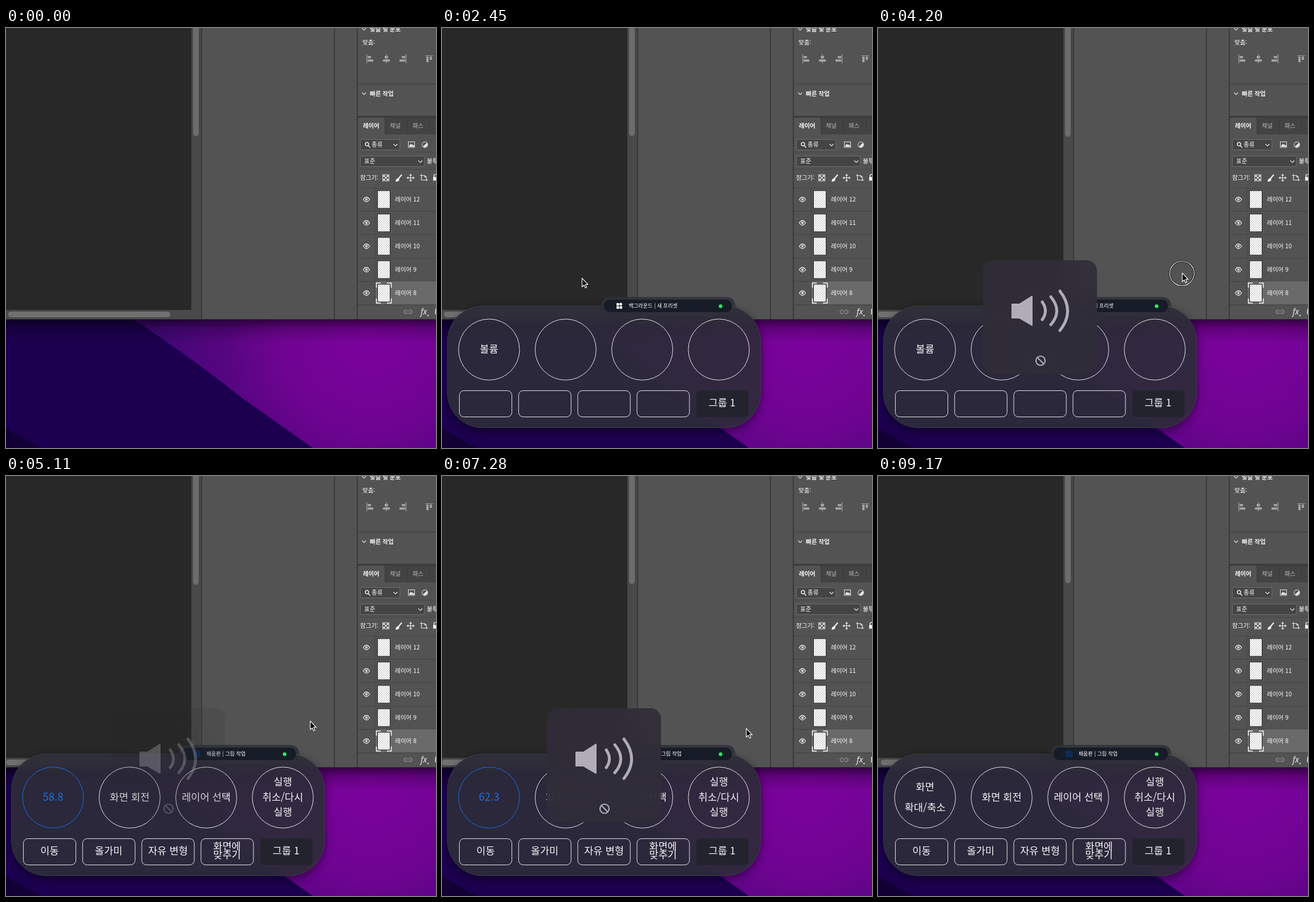
An HTML page that plays this animation: 754 px wide and 736 px high, repeating every 9310 ms.

```html
<!DOCTYPE html>
<html lang="ko">
<head>
<meta charset="utf-8">
<title>프리셋 전환</title>
<style>
  html, body { margin: 0; width: 100%; height: 100%; overflow: hidden; background: #1c004f; }
  #stage { position: relative; width: 754px; height: 736px; overflow: hidden; }
  #stage > * { position: absolute; left: 0; top: 0; }
  svg { display: block; }
  text { font-family: "Noto Sans CJK KR", "Noto Sans CJK", sans-serif; white-space: pre; }
  #stage > #panel {
    left: 9px; top: 487px; width: 548px; height: 212px; border-radius: 62px;
    border: 1px solid #5a5a6444; background: rgba(44, 45, 57, .91);
    backdrop-filter: blur(9px); box-shadow: 0 5px 16px #0007;
  }
  #stage > #hudBox {
    left: 184px; top: 407px; width: 200px; height: 200px; border-radius: 18px;
    background: rgba(48, 45, 57, .9); backdrop-filter: blur(24px);
  }
</style>
</head>
<body>
<div id="stage">
  <svg id="desktop" width="754" height="736"></svg>
  <div id="panel"></div>
  <svg id="face" width="754" height="736"></svg>
  <div id="hudBox"></div>
  <svg id="hudIcon" width="754" height="736" fill="none" stroke="#b0adb8">
    <path d="M235 484H248L270 470V521L248 508H235Z" fill="#b0adb8" stroke-width="2" stroke-linejoin="round"/>
    <path d="M288 480Q299 496 288 511M303 471Q324 496 303 520M319 461Q346 496 319 530" stroke-width="5" stroke-linecap="round"/>
    <path d="M279 577L291 589" stroke-width="2.200"/>
    <circle cx="285" cy="583" r="8" stroke-width="2.200"/>
  </svg>
  <svg id="pointer" width="754" height="736">
    <g id="cursor">
      <g id="click" fill="none">
        <circle cy="1" r="21.500" stroke="#111" stroke-width="3"/>
        <circle cy="1" r="21.500" stroke="#eee" stroke-width="1.200"/>
      </g>
      <path d="M.5 .5V15.500L4 12.300L6.300 17.500L8.700 16.400L6.400 11.400H11Z" fill="#080808" stroke="#fff" stroke-width="1.100" stroke-linejoin="round"/>
    </g>
  </svg>
</div>
<script>
const LOOP = 9310, STEP = 70;
const $ = id => document.getElementById(id);

const rect = (x, y, w, h, fill, more = '') =>
  `<rect x="${x}" y="${y}" width="${w}" height="${h}" fill="${fill}" ${more}/>`;
const path = (d, color = '#e4e4e4', width = 1.2, fill = 'none') =>
  `<path d="${d}" stroke="${color}" stroke-width="${width}" fill="${fill}"/>`;
// y is the optical middle of the line
const text = (x, y, str, size = 10.5, color = '#fff', weight = 500, more = '') =>
  `<text x="${x}" y="${y + size * .37}" font-size="${size}" fill="${color}" font-weight="${weight}" ${more}>${str}</text>`;
const label = (x, y, str, color = '#f4f4f7', size = 17.6) =>
  text(x, y, str, size, color, 350, 'text-anchor="middle"');
const chevron = (x, y, s = 3.5) => path(`M${x - s} ${y - s / 2}L${x} ${y + s / 2}L${x + s} ${y - s / 2}`);

function wallpaper() {
  return `<defs>
    <radialGradient id="violet" gradientUnits="userSpaceOnUse" cx="640" cy="540" r="400">
      <stop offset="0" stop-color="#7c029e"/><stop offset=".4" stop-color="#6f0492"/>
      <stop offset=".65" stop-color="#560580"/><stop offset="1" stop-color="#3c0872"/>
    </radialGradient>
    <linearGradient id="edge" x2="0" y2="1">
      <stop offset="0" stop-color="#000" stop-opacity=".55"/><stop offset=".4" stop-color="#000" stop-opacity=".2"/>
      <stop offset="1" stop-color="#000" stop-opacity="0"/>
    </linearGradient>
    <pattern id="checks" width="4" height="4" patternUnits="userSpaceOnUse">
      ${rect(0, 0, 4, 4, '#fff') + rect(0, 0, 2, 2, '#d6d6d6') + rect(2, 2, 2, 2, '#d6d6d6')}
    </pattern></defs>`
    + rect(0, 511, 754, 225, 'url(#violet)')
    + path('M0 511H225Q325 578 415 649L538 736H0Z', 'none', 0, '#1c004f')
    + path('M0 702L62 736H0Z', 'none', 0, '#120034')
    + rect(0, 511, 754, 40, 'url(#edge)');
}

function canvasArea() {
  return rect(0, 0, 754, 511, '#535353')
    + rect(0, 0, 325, 494, '#282828')
    + rect(325, 0, 17, 511, '#494949') + rect(0, 494, 342, 17, '#494949')
    + `<rect id="vThumb" x="328" y="-20" width="10" rx="5" fill="#6c6c6c"/>`
    + `<rect id="hThumb" y="497" height="10" rx="5" fill="#707070"/>`
    + [342, 575, 615].map(x => rect(x, 0, 2, 511, '#3a3a3a')).join('')
    + rect(0, 510, 754, 1, '#303030');
}

function alignSection() {
  const grey = '#a2a2a2';
  return chevron(628, 2) + text(638, 2, '맞춤 및 분포', 10.5, '#f0f0f0', 700)
    + text(625, 25, '맞춤:')
    + path('M632.5 46V62M667 46V62M701.500 46V62M735 48.500H749', grey)
    + rect(634, 49, 6, 4, grey) + rect(634, 55, 10, 4, grey)
    + rect(664, 49, 6, 4, grey) + rect(661, 55, 12, 4, grey)
    + rect(694, 49, 6, 4, grey) + rect(690, 55, 10, 4, grey)
    + rect(737, 50, 4, 10, grey) + rect(743, 50, 4, 6, grey)
    + rect(617, 98, 137, 1, '#3f3f3f')
    + chevron(628, 115) + text(638, 115, '빠른 작업', 10.5, '#f0f0f0', 700);
}

function layerControls() {
  const box = (y, w) => rect(621.5, y, w, 18, '#444', 'rx="1.5" stroke="#6b6b6b"');
  let out = rect(617, 154, 137, 32, '#3b3b3b')
    + rect(617, 157, 47, 29, '#535353') + rect(665, 157, 38, 28, '#434343')
    + rect(704, 157, 39, 28, '#434343') + rect(744, 157, 10, 28, '#434343')
    + text(626, 171, '레이어', 10.3, '#fff', 700)
    + text(673, 171, '채널', 10.3, '#b8b8b8') + text(713, 171, '패스', 10.3, '#b8b8b8')
    + [217, 247, 280].map(y => rect(617, y, 137, 1, '#474747')).join('')
    + box(195.5, 69) + box(224.5, 112)
    + '<circle cx="633" cy="203.500" r="3" fill="none" stroke="#eee" stroke-width="1.400"/>'
    + path('M635 206L638.500 209.500', '#eee', 1.6)
    + text(641, 204.500, '종류') + chevron(683, 205)
    + rect(705.5, 199.5, 11, 9.5, 'none', 'stroke="#e4e4e4"') + path('M707 208V206L710 203L712 205L713.500 204L716 207V208Z', 'none', 0, '#e4e4e4')
    + '<circle cx="734.500" cy="204.500" r="5" fill="none" stroke="#e4e4e4"/>'
    + path('M738 201A5 5 0 0 1 731 208Z', 'none', 0, '#e4e4e4')
    + text(628, 233.500, '표준') + chevron(726.500, 234) + text(738, 233.500, '불투명도')
    + text(621, 262.500, '잠그기:');
  out += rect(660.5, 257, 11, 11, 'none', 'stroke="#e4e4e4"');
  for (let i = 0; i < 9; i += 2) out += rect(661.5 + i % 3 * 3, 258 + Math.floor(i / 3) * 3, 3, 3, '#e4e4e4');
  return out
    + path('M694 257L688 264', '#eee', 2.2) + path('M688 263Q684 263 683 269Q689 270 690 265Z', 'none', 0, '#eee')
    + path('M704 262.500H715M709.500 257V268', '#eee')
    + path('M709.500 255.500L712 258.500H707ZM709.500 269.500L712 266.500H707ZM702.500 262.500L705.500 260V265ZM716.500 262.500L713.500 260V265Z', 'none', 0, '#eee')
    + path('M726 258.500H734L737 261V268M728.500 256V266.500H740M734 258V261H737')
    + rect(749, 261, 8, 6.5, '#eee') + path('M750.500 261V258Q753 255 756 258', '#eee', 1.4);
}

function layerRow(name, i) {
  const top = 280 + 41 * i, mid = top + 20.5, selected = i === 4;
  return (selected ? rect(648, top, 106, 41, '#6a6a6a') : '')
    + rect(617, top + 40.500, 137, 1, '#454545') + rect(646.5, top, 1, 41, '#474747')
    + path(`M626.500 ${mid}Q632 ${mid - 8} 637.500 ${mid}Q632 ${mid + 8} 626.500 ${mid}Z`, '#eee', 1.3)
    + `<circle cx="632" cy="${mid}" r="2" fill="#eee"/>`
    + rect(651.5, top + 5, 22, 31, 'url(#checks)', 'stroke="#222"')
    + (selected ? path(`M649.500 ${top + 11}V${top + 3}H657M668 ${top + 3}H675.500V${top + 11}M675.500 ${top + 30}V${top + 38}H668M657 ${top + 38}H649.500V${top + 30}`, '#fff', 1.5) : '')
    + text(682, mid, name);
}

function layerFooter() {
  return rect(617, 485, 137, 25, '#535353') + rect(617, 485, 137, 1, '#454545')
    + path('M704 494.500H701A3 3 0 0 0 701 500.500H704M706 494.500H709A3 3 0 0 1 709 500.500H706M702 497.500H708', '#999')
    + '<text x="727" y="502" font-size="14" font-style="italic" fill="#eee" style="font-family:\'Noto Sans\',sans-serif">fx</text>'
    + path('M738 503H742L740 505.500Z', 'none', 0, '#eee') + rect(752.5, 492, 2, 10, '#ddd');
}

$('desktop').innerHTML = wallpaper() + canvasArea() + alignSection() + layerControls()
  + [12, 11, 10, 9, 8].map((n, i) => layerRow('레이어 ' + n, i)).join('') + layerFooter();

const knobX = i => 82.5 + 134.3 * i, buttonX = i => 30.5 + 103.8 * i;
const four = [0, 1, 2, 3];

function pill(id, x, content) {
  return `<g id="${id}">`
    + path(`M${x - 5} 488V487Q${x - 4} 471.500 ${x + 9} 471.500H500Q514 473 514.500 488Z`, 'none', 0, '#2e3239d8')
    + rect(x, 476, 508.5 - x, 22, '#161c27', 'rx="11"') + content + '</g>';
}

$('face').innerHTML =
  path('M279.500 488Q280 472 294 472H498Q512 473 514 488', '#2c2d3088', 1)
  + pill('pillDesk', 284,
      rect(306, 482, 4.5, 4.5, '#fff') + rect(306, 487.5, 4.5, 4.5, '#fff') + rect(311.5, 487.5, 4.5, 4.5, '#fff')
      + path('M313.500 481L316.500 484L313.500 487L310.500 484Z', 'none', 0, '#fff')
      + text(327.500, 487, '백그라운드 | 새 프리셋', 9.1))
  + pill('pillDraw', 308, rect(329, 481, 12, 12, '#0c2a55', 'rx="2"') + text(351.500, 487, '채움판 | 그림 작업', 9.1))
  + '<circle cx="488.500" cy="487.500" r="3.200" fill="#30e860"/>'
  + four.map(i => `<circle id="knob${i}" cx="${knobX(i)}" cy="563.500" r="53.500" fill="none" stroke="#e6e6ec"/>`
      + rect(buttonX(i), 635.5, 92, 46, 'none', 'rx="8" stroke="#e6e6ec"')).join('')
  + rect(446, 635, 91.5, 47, '#23232e', 'rx="7"') + label(491, 656, '그룹 1')
  + `<g id="deskLabels">${label(82.5, 562.5, '볼륨')}</g>`
  + '<g id="drawLabels">'
    + `<g id="zoomName">${label(82.5, 544, '화면') + label(82.5, 580, '확대/축소')}</g>`
    + label(knobX(1), 562.5, '화면 회전') + label(knobX(2), 562.5, '레이어 선택')
    + label(knobX(3), 535, '실행') + label(knobX(3), 562.5, '취소/다시') + label(knobX(3), 588.5, '실행')
    + label(76.5, 656, '이동') + label(180, 656, '올가미') + label(284, 656, '자유 변형')
    + label(387.500, 648, '화면에') + label(387.500, 663, '맞추기')
  + '</g>'
  + label(82.5, 562.5, '<tspan id="zoomValue"></tspan>', '#1c6ee6', 18.5);

const clamp = v => Math.max(0, Math.min(1, v));
const ramp = (t, from, to) => clamp((t - from) / (to - from));
const within = (t, from, to) => t >= from && t < to;
const show = (id, alpha) => $(id).style.opacity = Number(alpha);

// time, x, y of the pointer tip
const route = [
  [210, 625, 745], [560, 245, 438], [3850, 245, 438], [4130, 533, 429],
  [5180, 533, 429], [5460, 625, 554], [6790, 625, 554], [7070, 533, 442],
  [8260, 533, 442], [8680, 610, 745]
];
function pointerAt(t) {
  const i = route.findIndex(key => key[0] > t);
  if (i <= 0) return [610, 760];
  const [a, b] = [route[i - 1], route[i]], p = ramp(t, a[0], b[0]), s = p * p * (3 - 2 * p);
  return [a[1] + (b[1] - a[1]) * s, a[2] + (b[2] - a[2]) * s];
}

function hudAlpha(t) {
  if (t < 2800) return 0;
  return t < 6440 ? 1 - ramp(t, 4830, 5250) : 1 - ramp(t, 7700, 8120);
}

function zoomAt(t) {
  if (within(t, 4550, 5460)) return 58.8 + (t - 5110) / 100;
  if (within(t, 7280, 8330)) return 62.3 + 6 * ramp(t, 7280, 8190);
  return null;
}

function draw(t) {
  const panel = ramp(t, 2170, 2450);
  show('panel', panel);
  show('face', panel);

  const drawPill = within(t, 4550, 5460) || t >= 7280;
  show('pillDraw', drawPill);
  show('pillDesk', !drawPill);
  const drawing = t < 4550 ? 0 : t < 7280 ? 1 - ramp(t, 5460, 5670) : 1;
  show('drawLabels', drawing);
  show('deskLabels', 1 - drawing);

  const zoom = zoomAt(t), turning = zoom !== null;
  show('zoomName', !turning);
  $('zoomValue').textContent = turning ? zoom.toFixed(1) : '';
  $('knob0').setAttribute('stroke', turning ? '#1c6ee6' : '#e6e6ec');

  // the backing clears faster than the icon
  const hud = hudAlpha(t);
  show('hudBox', hud * hud);
  show('hudIcon', hud);

  const grown = ramp(t, 7280, 8190), shifted = within(t, 2800, 7280);
  $('vThumb').setAttribute('height', 20 + (shifted ? 190.5 : 189.5 - 1.5 * grown));
  const left = t < 2800 ? 3.5 : 5 * grown;
  $('hThumb').setAttribute('x', left);
  $('hThumb').setAttribute('width', 288 - left);

  $('cursor').setAttribute('transform', `translate(${pointerAt(t)})`);
  show('click', within(t, 4130, 4410) || within(t, 5460, 5670) || within(t, 7070, 7210));
}

const start = performance.now();
function tick() {
  const t = (performance.now() - start) % LOOP;
  draw(Math.floor(t / STEP) * STEP);
  requestAnimationFrame(tick);
}
tick();
</script>
</body>
</html>
```
